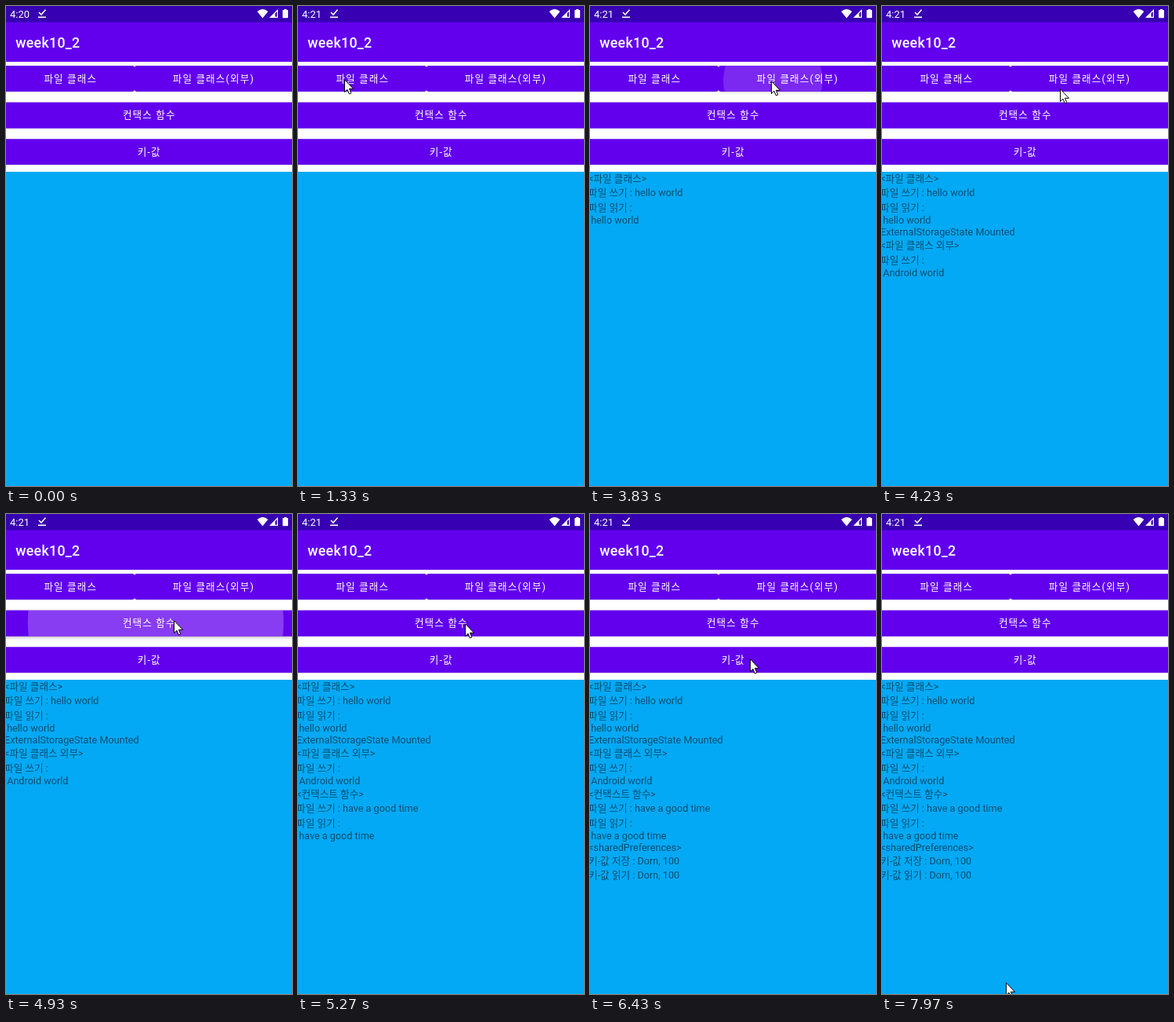
Animation of 365x611 px, one loop 8 s. Source, as an HTML page with a canvas:

```html
<!DOCTYPE html>
<html lang="ko">
<head>
<meta charset="utf-8">
<title>week10_2</title>
<style>
html, body { margin: 0; width: 100%; height: 100%; overflow: hidden; background: #fff; }
canvas { display: block; }
</style>
</head>
<body>
<canvas id="stage" width="365" height="611"></canvas>
<script>
const ctx = document.getElementById('stage').getContext('2d');
const LOOP = 8000, WIDTH = 365, SPLIT = 164;
const ROW_TOP = 76, ROW_STEP = 46.7, BUTTON_H = 32.7;
const BLEED = 4; // outer corners lie beyond the stage
const PURPLE = '#6200ee', DARK = '#3700b3', WHITE = '#fff';
const FONT = 'Roboto, "Noto Sans CJK KR", "Noto Sans CJK", sans-serif';

const button = (label, row, left, right, press, delay, ...lines) =>
  ({ label, y: ROW_TOP + row * ROW_STEP, left, right, press, shown: press + delay, lines });

// every tap adds its own lines to the output
const buttons = [
  button('파일 클래스', 0, 0, SPLIT, 2525, 110,
    '<파일 클래스>', '파일 쓰기 : hello world', '파일 읽기 :', ' hello world'),
  button('파일 클래스(외부)', 0, SPLIT, WIDTH, 3827, 130,
    'ExternalStorageState Mounted', '<파일 클래스 외부>', '파일 쓰기 :', ' Android world'),
  button('컨택스 함수', 1, 0, WIDTH, 4847, 150,
    '<컨택스트 함수>', '파일 쓰기 : have a good time', '파일 읽기 :', ' have a good time'),
  button('키-값', 2, 0, WIDTH, 5975, 130,
    '<sharedPreferences>', '키-값 저장 : Dorn, 100', '키-값 읽기 : Dorn, 100')
];

// pointer: from here, then moves that start, end and stop at x, y
const entry = { x: 8, y: 171 };
const moves = [
  { start: 800, end: 1400, x: 61, y: 90 },
  { start: 2830, end: 3500, x: 231, y: 95 },
  { start: 4100, end: 4500, x: 214, y: 135 },
  { start: 5180, end: 5670, x: 204, y: 184 },
  { start: 6460, end: 7000, x: 177, y: 427 },
  { start: 7290, end: 7970, x: 158, y: 596 }
];

const clamp = v => Math.max(0, Math.min(1, v));
const mix = (a, b, k) => a + (b - a) * k;
const smooth = k => k * k * (3 - 2 * k);

// cubic-bezier(0, 0, .2, 1)
function slowIn(p) {
  let lo = 0, hi = 1;
  for (let i = 0; i < 20; i++) {
    const s = (lo + hi) / 2;
    if (0.6 * s * s + 0.4 * s * s * s < p) lo = s; else hi = s;
  }
  return smooth(lo);
}

function pointerAt(t) {
  let { x, y } = entry;
  for (const m of moves) {
    const k = smooth(clamp((t - m.start) / (m.end - m.start)));
    x = mix(x, m.x, k);
    y = mix(y, m.y, k);
  }
  return { x, y };
}

function rect(color, x, y, w, h) {
  ctx.fillStyle = color;
  ctx.fillRect(x, y, w, h);
}

function text(str, x, y, size, color, weight = 400, spacing = 0, align = 'left') {
  ctx.font = `${weight} ${size}px ${FONT}`;
  ctx.letterSpacing = spacing + 'px';
  ctx.textAlign = align;
  ctx.fillStyle = color;
  ctx.fillText(str, x, y);
}

function poly(...pts) {
  ctx.beginPath();
  for (let i = 0; i < pts.length; i += 2) ctx.lineTo(pts[i], pts[i + 1]);
}

function statusBar(t) {
  rect(DARK, 0, 0, WIDTH, 20.7);
  text(t < 630 ? '4:20' : '4:21', 5, 15, 13, WHITE);
  ctx.strokeStyle = WHITE;
  ctx.lineWidth = 1.6;
  poly(42, 8, 45, 11, 50.5, 4.8);
  ctx.stroke();
  rect(WHITE, 41, 13.5, 10, 1.6);

  // wifi
  ctx.beginPath();
  ctx.moveTo(327.5, 15.5);
  ctx.lineTo(320.6, 7);
  ctx.quadraticCurveTo(327.5, 1.2, 334.4, 7);
  ctx.fill();

  // signal
  poly(336, 15, 347, 4, 347, 15);
  ctx.fill();
  ctx.fillStyle = DARK;
  poly(343.5, 9.2, 345.8, 6.9, 345.8, 13.8, 343.5, 13.8);
  ctx.fill();

  // battery
  rect(WHITE, 355, 4, 3, 2);
  ctx.beginPath();
  ctx.roundRect(353, 5, 7, 10.2, 0.8);
  ctx.fill();
}

function outline(b) {
  const x = b.left || -BLEED;
  const end = b.right < WIDTH ? b.right : WIDTH + BLEED;
  ctx.beginPath();
  ctx.roundRect(x, b.y, end - x, BUTTON_H, 3.5);
}

function shadow(b, t) {
  const age = t - b.press;
  const lift = clamp((age + 30) / 60) * clamp((330 - age) / 120);
  ctx.save();
  ctx.shadowColor = `rgba(0,0,0,${mix(0.2, 0.28, lift)})`;
  ctx.shadowBlur = 1 + 3 * lift;
  ctx.shadowOffsetY = 0.5 + lift;
  ctx.fillStyle = PURPLE;
  outline(b);
  ctx.fill();
  ctx.restore();
}

function ripple(b, age) {
  const w = b.right - b.left;
  const k = slowIn(clamp(age / 225));
  const alpha = 0.24 * mix(0.65, 1, clamp(age / 75)) * clamp((300 - age) / 150);
  const tap = pointerAt(b.press);
  ctx.save();
  outline(b);
  ctx.clip();
  ctx.fillStyle = `rgba(255,255,255,${alpha})`;
  ctx.beginPath();
  ctx.arc(mix(tap.x, b.left + w / 2, k), mix(tap.y, b.y + BUTTON_H / 2, k),
    mix(w * 0.3, Math.hypot(w, BUTTON_H) / 2, k), 0, 7);
  ctx.fill();
  ctx.restore();
}

function face(b, t) {
  const age = t - b.press;
  ctx.fillStyle = PURPLE;
  outline(b);
  ctx.fill();
  if (age >= 0 && age < 300) ripple(b, age);
  text(b.label, (b.left + b.right) / 2 + 0.3, b.y + 20.5, 12.6, WHITE, 400, 1.13, 'center');
}

// Korean lines stand taller than Latin ones
function output(t) {
  rect('#03a9f4', 0, 211, WIDTH, 400);
  let y = 209.7;
  for (const b of buttons) {
    if (t < b.shown) break;
    for (const line of b.lines) {
      const [up, down] = /[가-힣]/.test(line) ? [14.2, 4.35] : [11.7, 3];
      text(line, -2, Math.round(y + up), 12.65, 'rgba(0,0,0,.54)');
      y += up + down;
    }
  }
}

function pointer({ x, y }) {
  ctx.save();
  ctx.translate(Math.round(x), Math.round(y));
  poly(0.5, 0.8, 0.5, 16.6, 4, 13.3, 6.4, 19, 8.9, 17.9, 6.5, 12.3, 11.6, 12.3);
  ctx.closePath();
  ctx.fillStyle = WHITE;
  ctx.strokeStyle = '#000';
  ctx.lineWidth = 1;
  ctx.fill();
  ctx.stroke();
  ctx.restore();
}

function draw(t) {
  rect(WHITE, 0, 0, WIDTH, 611);
  rect(PURPLE, 0, 20, WIDTH, 51);
  statusBar(t);
  text('week10_2', 12.2, 52.5, 17.8, WHITE, 500, 0.3);
  buttons.forEach(b => shadow(b, t));
  buttons.forEach(b => face(b, t));
  output(t);
  if (t >= moves[0].start) pointer(pointerAt(t));
}

const start = performance.now();
function tick() {
  draw((performance.now() - start) % LOOP);
  requestAnimationFrame(tick);
}
tick();
</script>
</body>
</html>
```
